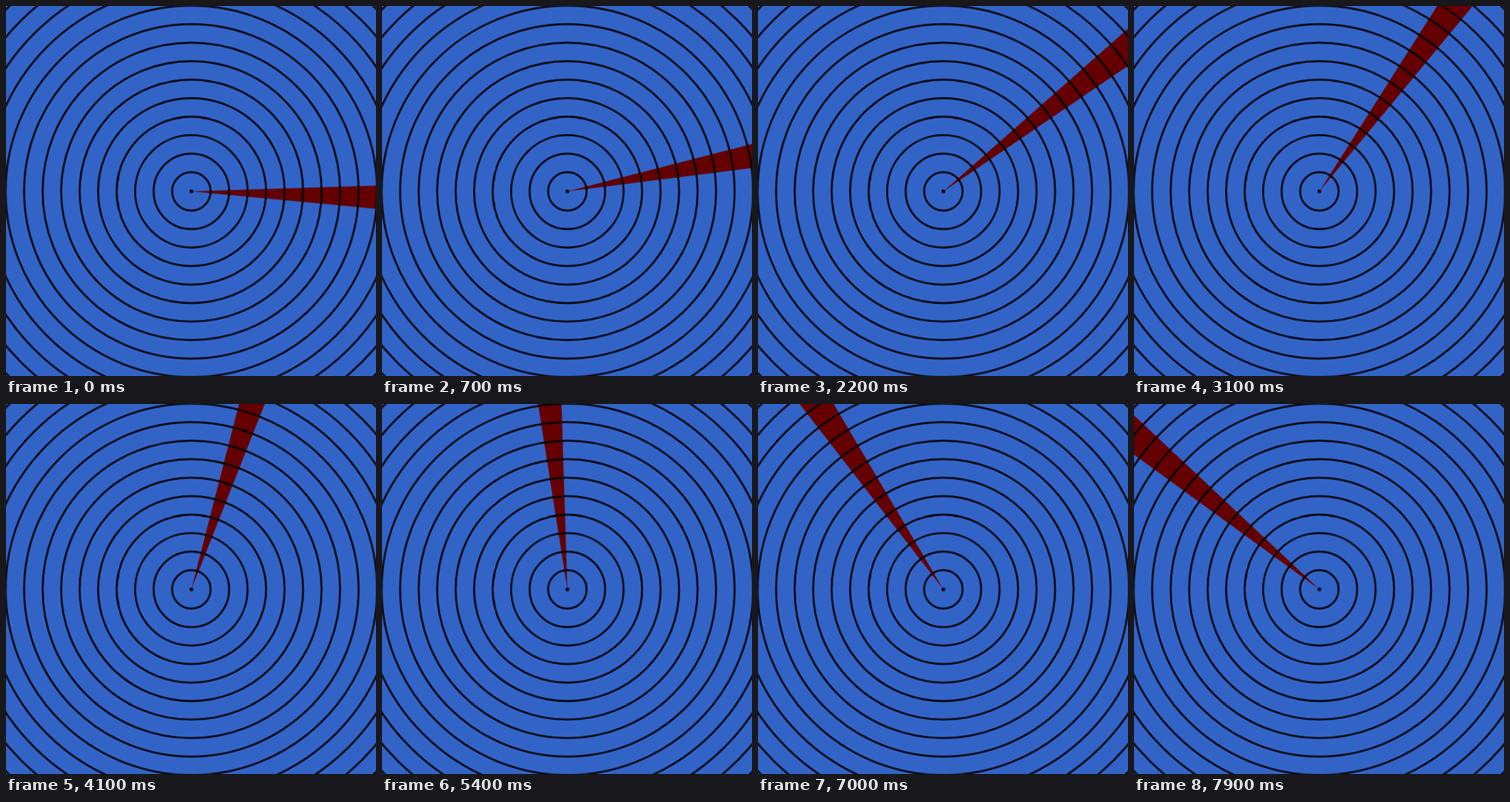
These frames come from a looping animation (500 px wide and 500 px high, 8 s). An HTML page:

```html
<!DOCTYPE html>
<html lang="en">
<head>
<meta charset="utf-8">
<title>Radar sweep</title>
<style>
  html, body { margin: 0; width: 100%; height: 100%; overflow: hidden; background: #3264c8; }
  svg { display: block; width: 500px; height: 500px; }
  .beam { fill: #640000; transform-origin: 0 0; animation: sweep 8s steps(80, end) infinite; }
  .rings { fill: none; stroke: #000; stroke-width: 2.5; }
  @keyframes sweep {
    from { transform: rotate(0deg); }
    to { transform: rotate(-144deg); }
  }
</style>
</head>
<body>
<svg viewBox="-250.5 -250.5 500 500">
  <!-- beam spans 1.8deg above to 5.4deg below the axis -->
  <path class="beam" d="M0 0L400 -12.57V37.81Z"/>
  <g class="rings"></g>
  <circle r="2.5"/>
</svg>
<script>
  const rings = document.querySelector('.rings');
  for (let i = 1; i <= 14; i++) {
    const ring = document.createElementNS(rings.namespaceURI, 'circle');
    ring.setAttribute('r', 25 * i + 1);
    rings.append(ring);
  }
</script>
</body>
</html>
```
